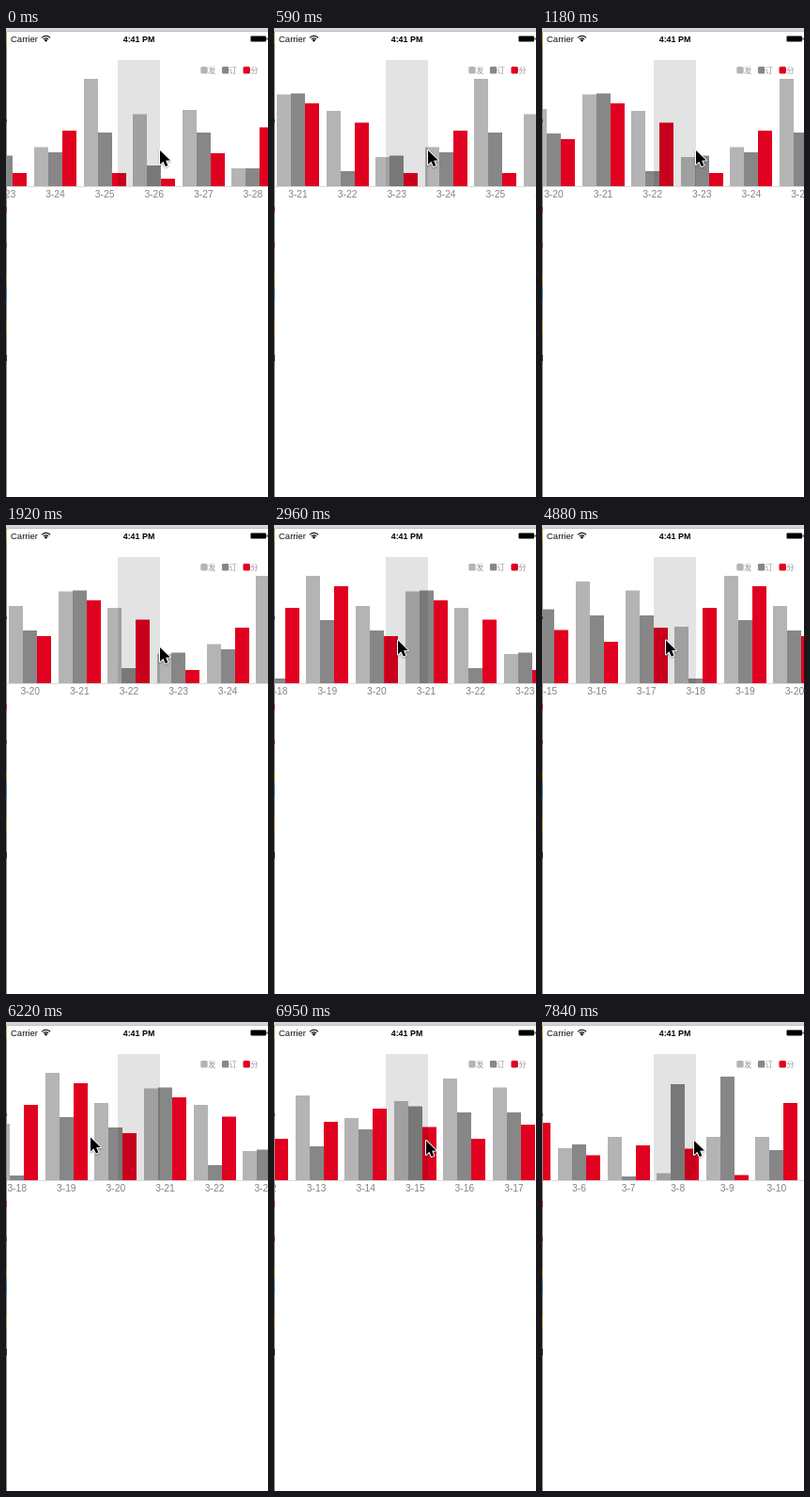
Write an HTML page with a canvas that moves like this. It is 279 by 498 pixels and loops after 7990 ms.

```html
<!DOCTYPE html>
<html lang="en">
<head>
<meta charset="utf-8">
<title>Scrolling bar chart</title>
<style>
html, body { margin: 0; width: 100%; height: 100%; overflow: hidden; background: #fff; }
canvas { display: block; width: 279px; height: 498px; }
</style>
</head>
<body>
<canvas id="stage"></canvas>
<script>
const W = 279, H = 498;
const LOOP = 7990, STEPS = 54, TICK = LOOP / STEPS;
const BASE = 168, PITCH = 52.6, BAR = 15, TAU = 495;
const COLORS = ['#b4b4b4', '#878787', '#e00020'];
const SANS = '"Liberation Sans", Arial, sans-serif';

// Bar heights per day of March, starting at FIRST_DAY
const FIRST_DAY = 5;
const DAYS = [
  [40, 52, 61], [34, 38, 26.5], [46, 4, 37], [7.5, 102, 33.5], [46, 110, 5.5],
  [46, 32, 82], [72, 48, 30], [58, 80, 44], [90, 36, 62], [66, 54, 76],
  [84, 78.5, 56.5], [108, 72, 44], [98.5, 72, 59], [60, 5, 80], [114, 67, 103],
  [82, 56, 50], [97.5, 98.5, 88], [80, 16, 67.5], [31, 32.5, 14], [41.5, 36, 59],
  [114, 57, 14], [76.5, 22, 8], [81, 57, 35], [19, 19, 62.5], [50, 40, 30]
];

// Each swipe: a drag from one point to another, then a decaying glide
const SWIPES = [
  { start: 0, release: 0, stop: 2222, from: [164, 130], to: [164, 130], glide: 187.5 },
  { start: 2600, release: 2820, stop: 5182, from: [103, 122.5], to: [132, 122.5], glide: 215.8 },
  { start: 5600, release: 5750, stop: 6600, from: [132, 122.5], to: [90, 122.5], glide: -183.3 },
  { start: 6600, release: 6720, stop: LOOP, from: [90, 122.5], to: [162, 126], glide: 698.2 }
];

const canvas = document.getElementById('stage');
const ctx = canvas.getContext('2d');
const dpr = window.devicePixelRatio || 1;
canvas.width = Math.round(W * dpr);
canvas.height = Math.round(H * dpr);

function rect(x, y, w, h, color) {
  ctx.fillStyle = color;
  ctx.fillRect(x, y, w, h);
}

function roundRect(x, y, w, h, r, color) {
  ctx.fillStyle = color;
  ctx.beginPath();
  ctx.roundRect(x, y, w, h, r);
  ctx.fill();
}

function text(str, x, y, font, color, align = 'left') {
  ctx.font = font;
  ctx.fillStyle = color;
  ctx.textAlign = align;
  ctx.fillText(str, x, y);
}

function poseAt(t) {
  let scroll = 0, cursor = SWIPES[0].from;
  for (const s of SWIPES) {
    if (t < s.start) break;
    const p = t >= s.release ? 1 : (t - s.start) / (s.release - s.start);
    cursor = s.from.map((v, i) => v + (s.to[i] - v) * p);
    scroll += cursor[0] - s.from[0];
    const coast = Math.max(0, Math.min(t, s.stop) - s.release);
    scroll += s.glide * (1 - Math.exp(-coast / TAU));
  }
  return { scroll, cursor };
}

function drawStatusBar() {
  text('Carrier', 5, 14.5, '9.5px ' + SANS, '#111');
  text('4:41 PM', 141.5, 14.5, 'bold 8.9px ' + SANS, '#000', 'center');

  ctx.strokeStyle = '#111';
  ctx.lineWidth = 1.3;
  for (const r of [3.4, 5.8]) {
    ctx.beginPath();
    ctx.arc(42.5, 14.2, r, -Math.PI * 0.77, -Math.PI * 0.23);
    ctx.stroke();
  }
  ctx.fillStyle = '#111';
  ctx.beginPath();
  ctx.arc(42.5, 13.3, 1.3, 0, Math.PI * 2);
  ctx.fill();

  roundRect(260.5, 8.5, 16.5, 6, 1, '#000');
  rect(277.5, 10.3, 1, 2.4, '#000');
}

function drawChart(scroll) {
  rect(1, BASE, W - 1, 1, '#dcdcdc');
  DAYS.forEach((heights, i) => {
    const day = FIRST_DAY + i;
    const left = 30 + (day - 24) * PITCH + scroll;
    if (left < -60 || left > W + 10) return;
    const x = Math.round(left);
    heights.forEach((h, k) => rect(x + k * BAR, BASE - h, BAR, h, COLORS[k]));
    text('3-' + day, left + 22.5, 179.5, '10.3px ' + SANS, '#838383', 'center');
  });
  rect(119, 34, 45, BASE - 34, 'rgba(0,0,0,0.108)');
}

function drawLegend() {
  ['发', '订', '分'].forEach((name, i) => {
    const x = 207.3 + i * 22.6;
    roundRect(x, 41, 7.4, 7.4, 1.5, COLORS[i]);
    text(name, x + 7.9, 47.7, '8px "Noto Sans CJK SC", "Noto Sans CJK", sans-serif', '#969696');
  });
}

function drawCursor([x, y]) {
  const points = [[0, 0], [0, 15], [3.4, 11.8], [5.8, 17], [8.4, 15.9], [6.1, 10.8], [10.8, 10.6]];
  ctx.save();
  ctx.translate(x, y);
  ctx.beginPath();
  points.forEach(([px, py]) => ctx.lineTo(px, py));
  ctx.closePath();
  ctx.lineJoin = 'round';
  ctx.lineWidth = 2;
  ctx.strokeStyle = '#fff';
  ctx.shadowColor = 'rgba(0,0,0,0.35)';
  ctx.shadowBlur = 2 * dpr;
  ctx.shadowOffsetY = dpr;
  ctx.stroke();
  ctx.shadowColor = 'transparent';
  ctx.fillStyle = '#000';
  ctx.fill();
  ctx.restore();
}

function drawWindowEdge() {
  rect(0, 0, W, 3, '#d6d6d6');
  rect(0, 3, W, 0.8, '#b0b0b0');
  rect(0, 4, 1, H - 4, '#8c8c8c');
  const specks = [
    [5, 12, '#c3a850'], [97, 3, '#444'], [190, 6, '#a03058'], [228, 5, '#a03058'],
    [262, 8, '#c09a38'], [276, 12, '#3a8fc0'], [312, 12, '#b89a40'], [347, 7, '#333']
  ];
  for (const [y, h, color] of specks) rect(0, y, 1, h, color);
}

function draw(t) {
  const { scroll, cursor } = poseAt(t);
  ctx.setTransform(dpr, 0, 0, dpr, 0, 0);
  rect(0, 0, W, H, '#fff');
  drawStatusBar();
  drawChart(scroll);
  drawLegend();
  drawWindowEdge();
  drawCursor(cursor);
}

function loop() {
  const t = performance.now() % LOOP;
  const step = Math.min(STEPS - 1, Math.floor((t + 8) / TICK));
  draw(step * TICK);
  requestAnimationFrame(loop);
}
loop();
</script>
</body>
</html>
```
